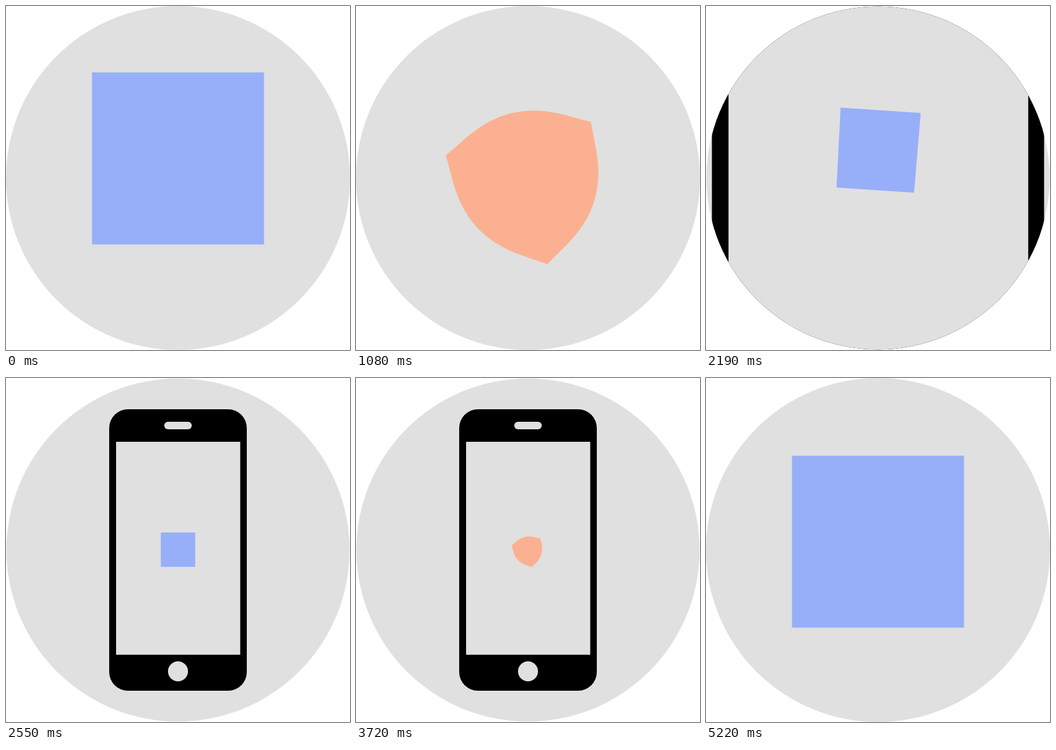
Write an HTML page with a canvas that moves like this. It is 550 px wide and 550 px high and loops after 5.25 s.

```html
<!DOCTYPE html>
<html>
<head>
<meta charset="utf-8">
<style>
  html, body { margin: 0; width: 100%; height: 100%; overflow: hidden; background: #fff; }
  canvas { display: block; }
</style>
</head>
<body>
<canvas id="stage" width="550" height="550"></canvas>
<script>
const ctx = document.getElementById('stage').getContext('2d');
const STEP = 30, STEPS = 175, CYCLE = 87, C = 275, R = 137.5;
const GREY = '#e0e0e0';
const BLUE = [151, 174, 249], ORANGE = [250, 194, 145], RED = [252, 146, 146];

const mix = (a, b, m) => a + (b - a) * m;
const rad = deg => deg * Math.PI / 180;

// Cosine ease from 0 to 1 between two moments
function ease(f, from, to) {
  const u = Math.min(1, Math.max(0, (f - from) / (to - from)));
  return (1 - Math.cos(Math.PI * u)) / 2;
}

// Eased value through [moment, value] keys
function track(f, keys) {
  let v = keys[0][1];
  for (let i = 1; i < keys.length; i++)
    v += (keys[i][1] - keys[i - 1][1]) * ease(f, keys[i - 1][0], keys[i][0]);
  return v;
}

const HEIGHT = [[-2.7, 0], [4.3, -96], [11.3, 0], [27, 0], [31.5, -31], [40.5, 39],
  [50, -31], [57.8, 4], [62, 0], [64, 0], [70, -96], [73, -96], [80, 0], [84.3, 0], [91.3, -96]];

// Distance from the centre to the edge of a regular polygon
function edge(apothem, n, deg) {
  const part = 360 / n;
  const a = ((deg % part) + part) % part - part / 2;
  return apothem / Math.cos(rad(a));
}
const square = deg => edge(R, 4, deg - 45);
const circle = () => R;
const triangle = deg => edge(R / 2, 3, deg + 90);

function blend(from, to, m) {
  const pts = [];
  for (let d = 0; d < 360; d++) {
    const r = mix(from(d), to(d), m);
    pts.push([r * Math.cos(rad(d)), r * Math.sin(rad(d))]);
  }
  return pts;
}

// The triangle's tip splits into the two upper corners of a square
function triangleToSquare(m) {
  const top = R * m, base = mix(R * Math.sqrt(3) / 2, R, m), low = mix(R / 2, R, m);
  return [[-top, -R], [top, -R], [base, low], [-base, low]];
}

function pose(f) {
  if (f < 20) return {
    pts: blend(square, circle, ease(f, 1.5, 8.2)),
    turn: 90 * ease(f, 1, 8), from: BLUE, to: ORANGE, tint: ease(f, 0, 9)
  };
  if (f < 60) return {
    pts: blend(circle, triangle, ease(f, 33, 40)),
    turn: 360 * ease(f, 32, 49), from: ORANGE, to: RED, tint: ease(f, 32, 42)
  };
  return {
    pts: triangleToSquare(ease(f, 66, 74)),
    turn: -180 * ease(f, 64.27, 73.9), from: RED, to: BLUE, tint: ease(f, 62.5, 73)
  };
}

function drawShape(f, scale) {
  const { pts, turn, from, to, tint } = pose(f);
  ctx.save();
  ctx.translate(C, C);
  ctx.scale(scale, scale);
  ctx.translate(0, track(f, HEIGHT));
  ctx.rotate(rad(turn));
  ctx.beginPath();
  pts.forEach(p => ctx.lineTo(...p));
  ctx.closePath();
  ctx.fillStyle = `rgb(${from.map((v, i) => Math.round(mix(v, to[i], tint)))})`;
  ctx.fill();
  ctx.restore();
}

function box(x, y, w, h, r, color) {
  ctx.beginPath();
  ctx.roundRect(x, y, w, h, r);
  ctx.fillStyle = color;
  ctx.fill();
}

function disc(x, y, r, color) {
  ctx.beginPath();
  ctx.arc(x, y, r, 0, 2 * Math.PI);
  ctx.fillStyle = color;
  ctx.fill();
}

function phone() {
  box(165, 50, 220, 450, 30, '#000');
  box(176, 102, 198.5, 340.5, 0, GREY);
  box(253, 70, 44, 12, 6, GREY);
  disc(275, 469, 16, GREY);
}

function tablet() {
  box(47, 126, 450, 300, 37, '#2a2736');
  box(72, 151, 400, 249, 13, GREY);
  box(234, 405, 75, 13, 6.5, GREY);
}

function drawDevice(g, scale) {
  const k = 1 + (scale / 0.2 - 1) * 1.05;
  ctx.save();
  ctx.translate(C, C);
  ctx.scale(k, k);
  ctx.rotate(g < 126.8 ? rad(90 * ease(g, 123.6, 126.8)) : 0);
  ctx.translate(-C, -C);
  (g < 126.8 ? phone : tablet)();
  ctx.restore();
}

function draw(step) {
  // The motion pauses for one step at mid-loop
  const g = step < 91 ? step : step - 1;
  const scale = 1 - 0.8 * ease(g, 66.85, 77) + 0.8 * ease(g, 152, 161.5);
  const framed = g >= 73 && g < 162;

  ctx.clearRect(0, 0, 550, 550);
  ctx.save();
  disc(C, C, framed ? 274.3 : 275, GREY);
  ctx.clip();
  if (framed) drawDevice(g, scale);
  drawShape(g % CYCLE, scale);
  ctx.restore();
}

function tick() {
  draw(Math.floor(performance.now() / STEP) % STEPS);
  requestAnimationFrame(tick);
}
tick();
</script>
</body>
</html>
```
